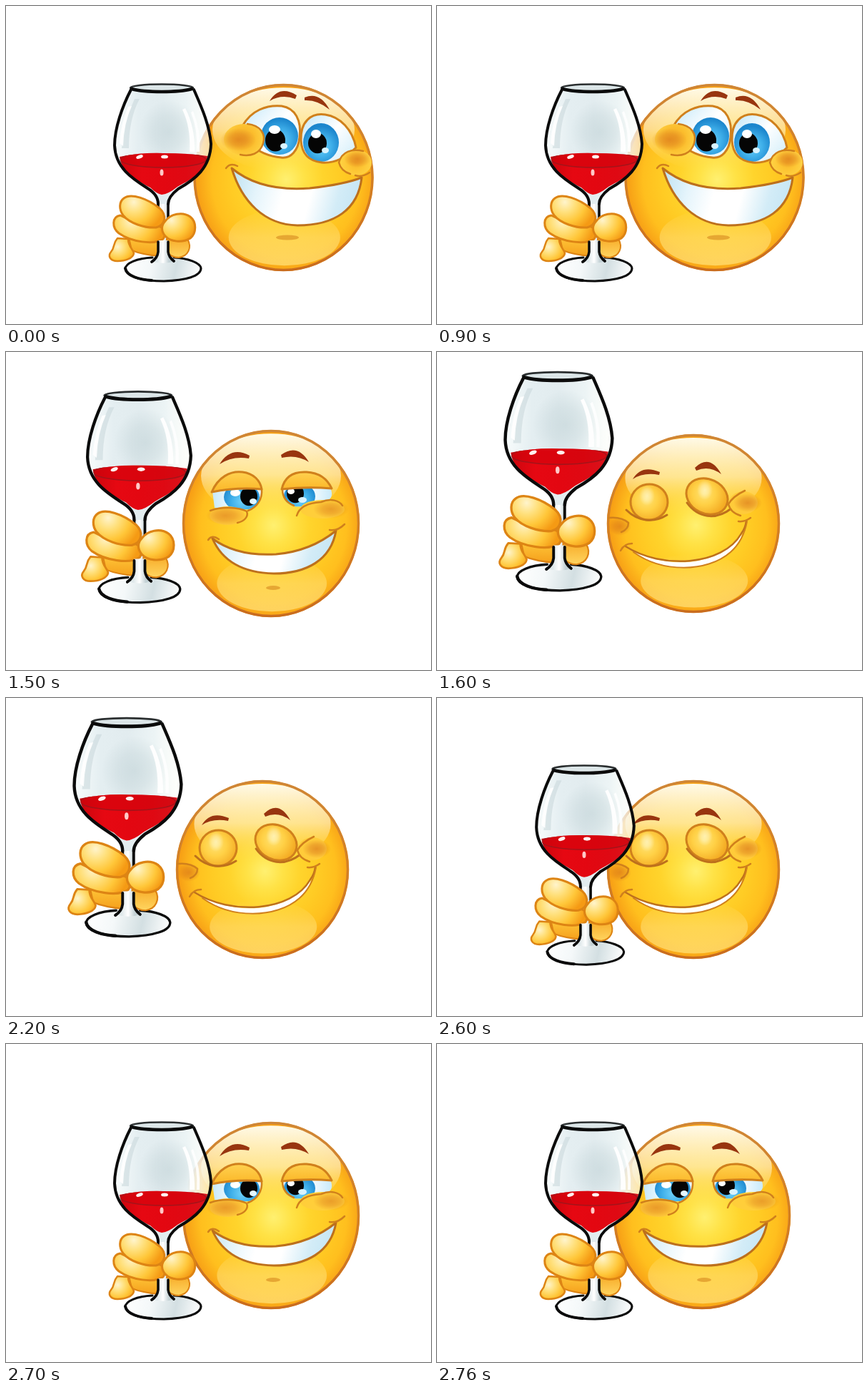
An HTML page with a canvas for the animation above (2800 ms loop, 595x445 px).

```html
<!DOCTYPE html>
<html lang="en">
<head>
<meta charset="utf-8">
<title>Cheers</title>
<style>
html, body { margin: 0; width: 100%; height: 100%; overflow: hidden; background: #fff; }
canvas { display: block; }
</style>
</head>
<body>
<canvas id="stage" width="595" height="445"></canvas>
<script>
const ctx = document.getElementById('stage').getContext('2d');
const LINE = '#d0801c', LIP = '#bd701c', BROW = '#98350f', INK = '#0b0b0b', EDGE = '#dd8414';

function paint(d, fill, stroke, width = 2) {
  const path = new Path2D(d);
  if (fill) { ctx.fillStyle = fill; ctx.fill(path); }
  if (stroke) { ctx.strokeStyle = stroke; ctx.lineWidth = width; ctx.stroke(path); }
}

function oval(x, y, rx, ry, fill, stroke, width = 2, turn = 0) {
  ctx.beginPath();
  ctx.ellipse(x, y, rx, ry, turn, 0, Math.PI * 2);
  if (fill) { ctx.fillStyle = fill; ctx.fill(); }
  if (stroke) { ctx.strokeStyle = stroke; ctx.lineWidth = width; ctx.stroke(); }
}

function withStops(g, colors) {
  colors.forEach((c, i) => g.addColorStop(i / (colors.length - 1), c));
  return g;
}
const linear = (x0, y0, x1, y1, ...colors) => withStops(ctx.createLinearGradient(x0, y0, x1, y1), colors);
const radial = (x, y, r, ...colors) => withStops(ctx.createRadialGradient(x, y, 0, x, y, r), colors);

function clipped(d, draw) {
  ctx.save();
  ctx.clip(new Path2D(d));
  draw();
  ctx.restore();
}

// Soft round spot, squashed to rx by ry
function glow(x, y, rx, ry, rgb, alpha) {
  ctx.save();
  ctx.translate(x, y);
  ctx.scale(rx, ry);
  oval(0, 0, 1, 1, radial(0, 0, 1, `rgba(${rgb},${alpha})`, `rgba(${rgb},${alpha * 0.65})`, `rgba(${rgb},0)`));
  ctx.restore();
}
const blush = (x, y, rx, ry, alpha = 0.6) => glow(x, y, rx, ry, '214,110,24', alpha);

function head(x, y, rx, ry) {
  ctx.save();
  ctx.translate(x, y);
  ctx.scale(rx, ry);
  oval(0, 0, 1, 1, radial(0.03, 0.02, 1.03, '#fff070', '#ffe246', '#ffd42c', '#ffcb24', '#ffbf1e', '#f69a14'));
  oval(0, -0.51, 0.79, 0.45, linear(0, -0.96, 0, -0.08, 'rgba(255,252,236,.98)', 'rgba(255,240,190,.7)', 'rgba(255,220,90,0)'));
  oval(0.01, 0.64, 0.62, 0.3, linear(0, 0.34, 0, 0.94, 'rgba(255,222,110,0)', 'rgba(255,222,112,.6)', 'rgba(255,220,112,.8)'));
  ctx.restore();
  oval(x, y, rx - 1.5, ry - 1.5, null, linear(0, y - ry, 0, y + ry, '#cf8636', '#d48024', '#c96c1e'), 3.5);
}

function iris(x, y, rx, ry, px, py, pr) {
  oval(x, y, rx, ry, radial(x, y + 6, rx * 1.15, '#6fd0f8', '#40b0ea', '#1c86cd'));
  oval(px, py, pr, pr * 1.1, '#050505');
}

function grin(d, left, right) {
  paint(d, linear(left, 240, right, 290, '#bfe2f2', '#e4f4fb', '#ffffff', '#ffffff', '#d3ecf7', '#c2e4f3'), LIP, 3);
}

function happyFace() {
  head(388.5, 240, 126, 131);
  paint('M369 133Q383 110 407 125L405 130Q386 123 369 133Z', BROW);
  paint('M418 128Q439 119 453 145Q436 131 418 132Z', BROW);

  const left = 'M331 168C343 146 365 138 386 140C405 143 414 160 411 184C409 202 399 214 385 212C370 211 352 204 340 192Z';
  paint(left, linear(335, 145, 400, 210, '#c9eafa', '#ffffff', '#e6f5fc'));
  clipped(left, () => {
    iris(383, 182, 26, 26, 377, 188, 14);
    oval(376, 173, 8, 6, '#fff');
    oval(389, 196, 5, 4, '#d8f3ff');
  });
  paint(left, null, LINE, 3);

  const right = 'M413 188C412 162 427 149 447 152C468 155 485 173 490 198C480 208 464 221 442 219C424 217 414 207 413 188Z';
  paint(right, linear(420, 155, 485, 210, '#c9eafa', '#ffffff', '#d6effa'));
  clipped(right, () => {
    iris(441, 191, 25, 27, 436, 192, 13);
    oval(434, 179, 7, 6, '#fff');
    oval(447, 202, 5, 4, '#d8f3ff');
  });
  paint(right, null, LINE, 3);

  oval(333, 187, 28, 22, radial(333, 185, 29, '#f6b22a', '#fbbd2d', '#ffd243'));
  blush(325, 187, 25, 16);
  paint('M338 165C356 167 364 179 360 192C356 207 342 211 328 208', null, LINE, 2.5);
  oval(490, 219, 22, 18, radial(490, 219, 22, '#f7b42a', '#fdc533', '#ffd243'));
  blush(492, 214, 19, 12);
  paint('M466 219C470 204 484 199 500 203M466 219Q469 231 482 235', null, LINE, 2.5);

  grin('M316 227C345 251 385 258 425 255C452 252 478 248 498 240C493 285 460 307 408 307C362 306 330 274 316 227Z', 316, 498);
  paint('M308 227Q314 219 324 224M489 237Q499 240 509 233', null, LINE, 2.5);
  oval(394, 324, 16, 3.5, 'rgba(214,135,30,.6)');
}

function sleepyFace() {
  head(371, 240, 124, 131);
  paint('M299 157Q315 131 341 145L340 149Q317 145 299 157Z', BROW);
  paint('M385 144Q408 127 424 154Q407 143 386 148Z', BROW);

  const left = 'M289 195L357 191C359 205 353 216 340 220C322 221 303 219 292 218Z';
  paint(left, linear(290, 0, 358, 0, '#c9eafa', '#ffffff', '#e6f5fc'));
  clipped(left, () => {
    iris(330, 203, 25, 19, 340, 202, 12);
    oval(321, 197, 7, 5, '#fff');
    oval(346, 209, 5, 4, '#e4f7ff');
  });
  paint('M288 196C297 175 314 166 331 168C347 170 356 180 358 192Q323 189 288 196Z', linear(0, 167, 0, 195, '#ffd251', '#fbb728'), LINE, 3);
  paint('M358 192C359 206 352 217 339 222', null, LINE, 2.5);

  const right = 'M387 192L454 190C459 201 455 208 444 210C430 215 415 217 404 216C391 212 387 204 387 192Z';
  paint(right, linear(388, 0, 456, 0, '#e6f5fc', '#ffffff', '#c9eafa'));
  clipped(right, () => {
    iris(411, 202, 22, 18, 405, 198, 12);
    oval(399, 195, 5, 4, '#fff');
    oval(415, 207, 6, 4, '#d8f3ff');
  });
  paint('M386 192C390 174 403 167 421 168C439 169 450 178 456 191Q422 188 386 192Z', linear(0, 167, 0, 192, '#ffd251', '#fbb728'), LINE, 3);
  paint('M387 192C387 204 393 211 403 215', null, LINE, 2.5);

  oval(310, 229, 25, 13, '#fec83a');
  blush(307, 229, 27, 13, 0.5);
  paint('M286 222C301 216 326 217 337 223C340 231 333 237 324 239', null, LINE, 2.5);
  oval(443, 220, 31, 13, '#ffce3a');
  blush(455, 220, 25, 13, 0.5);
  paint('M407 229C411 215 425 211 441 210C455 204 467 208 471 215', null, LINE, 2.5);

  grin('M289 261C313 279 344 285 378 283C413 280 441 267 462 250C455 291 421 310 375 310C330 309 302 291 289 261Z', 289, 462);
  paint('M283 263Q288 255 298 262M453 249Q464 251 474 241', null, LINE, 2.5);
  oval(374, 330, 10, 3, 'rgba(214,135,30,.6)');
}

function closedFace() {
  head(359, 240, 121, 125);
  paint('M274 178Q286 157 312 168L311 172Q289 168 274 178Z', BROW);
  paint('M361 162Q382 142 398 171Q381 158 363 166Z', BROW);

  const lid = (x, y, rx, ry, turn) => {
    oval(x, y, rx, ry, radial(x - 4, y - 4, 32, '#ffe373', '#ffd045', '#f4ac24'), LINE, 3, turn);
    glow(x - 3, y - 9, 11, 14, '255,250,215', 0.65);
  };
  lid(297, 210, 26, 25, -0.15);
  paint('M265 221C281 237 303 240 322 228', null, LIP, 3);
  lid(378, 202, 30, 24, 0.45);
  paint('M350 211C365 232 390 236 412 219', null, LIP, 3);

  blush(256, 244, 16, 13);
  paint('M240 232Q258 230 268 239Q268 248 258 252', null, LINE, 2.5);
  oval(429, 211, 20, 16, '#ffcb3a');
  blush(435, 211, 20, 13);
  paint('M431 194Q414 202 408 213Q411 225 425 229', null, LINE, 2.5);

  paint('M266 272C313 305 394 303 427 255C425 266 418 273 411 279C374 313 306 309 266 272Z', '#fff');
  paint('M264 272C314 304 400 300 426 254Q432 246 433 236', null, LIP, 2.5);
  paint('M275 280C315 309 378 309 411 280Q429 264 434 237', null, LINE, 2);
  paint('M257 278Q262 268 273 268M422 237Q431 238 439 232', null, LINE, 2.5);
}

const skin = (x, y, r) => radial(x - r * 0.25, y - r * 0.35, r * 1.2, '#fff4cc', '#ffe07c', '#ffc638', '#f59a14');

function hand() {
  paint('M172 324C180 320 212 324 217 330L215 350C202 349 186 346 176 342Z', linear(0, 322, 0, 350, '#ffc83a', '#f5a01c'), EDGE);
  paint('M225 326H254C261 338 255 350 242 352Q232 352 226 345Z', linear(0, 326, 0, 352, '#f8ae2b', '#ffd560'), EDGE);
  paint('M156 325C149 333 153 337 147 344C142 350 146 357 156 357C167 357 178 353 179 346C178 340 171 337 171 326Z', skin(162, 345, 23), EDGE, 2.5);
  paint('M160 293C148 295 148 310 158 318C175 330 207 335 220 326C227 316 220 308 208 307C189 307 174 300 160 293Z', skin(185, 314, 38), EDGE, 3);
  paint('M165 269C175 261 199 270 215 283C226 293 223 307 210 310C194 311 173 304 164 293C158 285 158 274 165 269Z', skin(188, 287, 36), EDGE, 3);
}

function thumb() {
  paint('M223 301C230 291 247 287 258 295C267 302 267 318 258 325C247 332 230 330 223 322C217 315 217 307 223 301Z', skin(239, 310, 29), EDGE, 3);
}

function foot() {
  oval(220, 367, 53, 18, linear(168, 355, 272, 378, '#ffffff', '#f4f8f9', '#d3dfe2', '#ffffff'));
  paint('M205 352C183 353 167 360 167 368C169 380 194 385 221 385C252 384 273 378 273 367C272 359 254 353 235 352', null, INK, 3);
  paint('M167 367C169 378 187 383 204 384', null, INK, 4);
}

function stem(top) {
  paint(`M213 ${top}H227V344Q228 353 236 357Q220 362 204 357Q212 352 213 344Z`, linear(212, 0, 228, 0, '#dfe8ea', '#ffffff', '#c3d1d5'));
  paint(`M213 ${top + 2}V344Q212 353 204 358M227 ${top + 2}V344Q228 352 235 357`, null, INK, 3.5);
}

function bowl() {
  const left = 'M175 117C163 140 152 171 152 195C153 226 176 241 198 255Q213 264 213 277';
  const right = 'Q227 267 241 256C264 243 286 227 287 193C285 166 273 140 263 117';
  const shape = `${left}H227${right}Z`;
  paint(shape, linear(152, 0, 287, 0, 'rgba(248,252,252,1)', 'rgba(228,238,241,1)', 'rgba(226,236,239,1)', 'rgba(236,244,245,1)', 'rgba(255,255,250,.6)'));
  clipped(shape, () => {
    glow(228, 176, 42, 44, '190,208,212', 0.55);
    paint('M180 130Q164 163 162 199H172Q172 158 187 130Z', 'rgba(200,215,219,.55)');
    paint('M171 141Q161 164 159 192L164 196Q165 164 176 140Z', 'rgba(255,255,255,.9)');
    paint('M247 145Q259 170 257 204H264Q265 170 251 143Z', 'rgba(255,255,255,.95)');
    paint('M259 149Q269 174 267 204H271Q273 174 262 147Z', 'rgba(255,255,255,.85)');
  });

  const wine = 'M159 211Q188 205 220 206Q256 206 282 210C281 231 262 241 240 253Q226 264 218 264Q211 263 202 254C181 243 162 233 159 211Z';
  paint(wine, linear(159, 0, 283, 0, '#cc060e', '#e60812', '#e30711', '#df0913', '#d8141c'));
  clipped(wine, () => {
    oval(220, 215, 60, 11, 'rgba(205,0,10,.45)', '#a3141a', 1.5);
    paint('M160 218Q170 239 201 253L206 261Q164 244 156 220Z', 'rgba(130,0,5,.4)');
  });
  oval(187, 211, 5, 2.5, '#fff0ee', null, 2, -0.35);
  oval(222, 211, 5, 2.5, '#fff0ee');
  oval(218, 233, 2.5, 4.5, '#ffc9c8');

  paint(left, null, INK, 4);
  paint('M227 277' + right, null, INK, 4);
  oval(218, 114.5, 44, 5, '#dce6e8', '#2a2e2f', 2.5);
  paint('M176 116Q190 120 218 120Q246 120 260 116', null, INK, 4.5);
}

// x, y: centre of the foot
function toast(x, y, scale) {
  ctx.save();
  ctx.translate(x, y);
  ctx.scale(scale, scale);
  ctx.translate(-220, -368);
  foot();
  stem(264);
  hand();
  stem(328);
  thumb();
  bowl();
  ctx.restore();
}

const poses = [
  { until: 1500, face: happyFace, glass: [220, 368, 1] },
  { until: 1600, face: sleepyFace, glass: [187, 332.5, 1.072] },
  { until: 2600, face: closedFace, glass: [171, 315, 1.11] },
  { until: 2700, face: closedFace, glass: [208, 356, 1.012] },
  { until: 2800, face: sleepyFace, glass: [220, 368, 1] }
];

ctx.lineCap = ctx.lineJoin = 'round';
const start = performance.now();

function frame() {
  const t = (performance.now() - start) % 2800;
  const pose = poses.find(p => t < p.until);
  ctx.fillStyle = '#fff';
  ctx.fillRect(0, 0, 595, 445);
  pose.face();
  toast(...pose.glass);
  requestAnimationFrame(frame);
}
frame();
</script>
</body>
</html>
```
